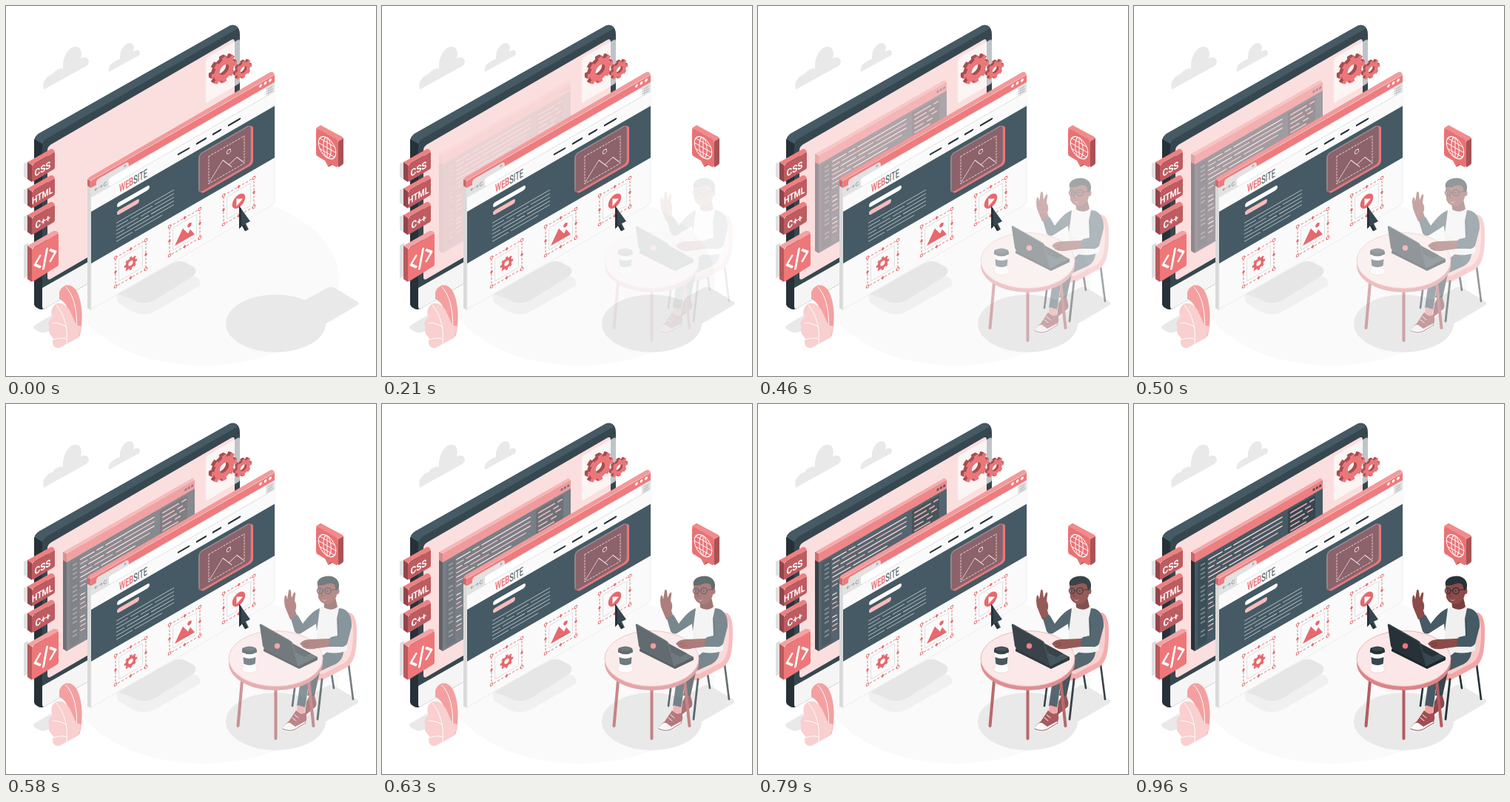
An HTML page for the animation above (1 s loop, 500 by 500 pixels).

```html
<!DOCTYPE html>
<html lang="en">
<head>
<meta charset="utf-8">
<title>Web development</title>
<style>
  html, body { margin: 0; width: 100%; height: 100%; overflow: hidden; background: #fff; }
  svg { display: block; width: 100vw; height: 100vh; }
  text { font-family: Roboto, Arial, sans-serif; }
  .fade { animation: fade 1s ease-in-out infinite; }
  @keyframes fade { from { opacity: 0; } to { opacity: 1; } }
  .line { fill: none; stroke-linecap: round; stroke-linejoin: round; }
  .tag { font-weight: 700; fill: #fff; }
</style>
</head>
<body>
<svg viewBox="0 0 500 500">
  <defs>
    <g id="gear" fill="none" stroke="currentColor">
      <circle r="10" stroke-width="7.5"/>
      <circle r="14.7" stroke-width="5" pathLength="16" stroke-dasharray="1" stroke-dashoffset=".5"/>
    </g>
    <g id="solidGear">
      <g color="#a34f53">
        <use href="#gear" x="-4" y="-4.4"/>
        <use href="#gear" x="-3" y="-3.3"/>
        <use href="#gear" x="-2" y="-2.2"/>
        <use href="#gear" x="-1" y="-1.1"/>
      </g>
      <use href="#gear" color="#ea7779"/>
    </g>
    <g id="handles">
      <rect x="4.5" y="4.5" width="32" height="30" rx="2" fill="#fafafa" stroke="#dcdcdc" stroke-width=".8"/>
      <rect width="41" height="39" fill="none" stroke="#e9767a" stroke-dasharray="3 2"/>
      <g fill="#fff" stroke="#e06b6f">
        <circle r="1.8"/><circle cx="41" r="1.8"/>
        <circle cy="39" r="1.8"/><circle cx="41" cy="39" r="1.8"/>
      </g>
      <path d="M20.5-2.5l2 2.5-2 2.5-2-2.5zM20.5 36.5l2 2.5-2 2.5-2-2.5zM0 17l2 2.5-2 2.5-2-2.5zM41 17l2 2.5-2 2.5-2-2.5z" fill="#e06b6f"/>
    </g>
    <g id="label">
      <path d="M24 213l6-3v24l-6-3z" fill="#e0e0e0"/>
      <path d="M29 211L60 193.500Q64 192 66 197L35 215z" fill="#ef8082"/>
      <path d="M29 211l6 4v23l-6-4z" fill="#90464b"/>
      <path d="M35 217Q35 215 37 214L64 198.300Q66 197 66 199V218Q66 220 64 221L37 237Q35 238 35 236z" fill="#bd5c61"/>
    </g>
  </defs>

  <!-- floor and shadows -->
  <ellipse cx="267" cy="370" rx="183" ry="116" fill="#fafafa"/>
  <g fill="#e9e9e9">
    <ellipse cx="364.500" cy="429" rx="67.500" ry="39"/>
    <path d="M403 398L434 381Q439 378 444 381L474 399Q479 402 474 405L429 431z"/>
    <path d="M38 432L68 414 88 426 54 441Q48 443 44 440L39 437Q35 434 38 432z"/>
  </g>

  <!-- clouds -->
  <g fill="#e9e9e9">
    <path d="M51 113C48 102 55 95 63 92C67 86 72 84 77 85C76 67 86 54 95 55C102 56 103 63 101 71C107 68 112 70 112 76C111 79 109 81 105 83z"/>
    <path d="M139 89C138 82 141 78 146 76C149 73 152 72 154 72C153 62 159 51 167 50C172 50 174 55 172 62C177 58 182 60 181 65C180 67 178 68 175 69z"/>
  </g>

  <!-- stand -->
  <path d="M150 390L215 352 258 367Q264 371 262 378L204 411Q186 422 168 411L153 402Q148 398 150 390z" fill="#f0f0f0"/>
  <path d="M151 389L226 347Q236 342 245 348L254 353Q259 358 254 364L202 397Q185 406 170 396z" fill="#e6e6e6"/>

  <!-- monitor -->
  <path d="M38 184Q38 176 45 172L300 28Q306 24 311 27Q316 30 316 38V257L52 409Q48 411 44 409L41 407Q38 405 38 401z" fill="#37474f"/>
  <path d="M38 184Q38 176 45 172L300 28Q306 24 311 27L314 30 55 179Q49 183 49 190V410L41 407Q38 405 38 401z" fill="#455a64"/>
  <path d="M38 180L49 186V410Q44 410 41 407Q38 405 38 401z" fill="#263238"/>
  <path d="M49 381L130 335V364L53 408.500Q49 411 49 405z" fill="#f5f5f5"/>
  <path d="M56 195Q56 190 61 187L304 46Q309 43 309 49V224L60 369Q56 371 56 366z" fill="#fbdfdf"/>
  <path d="M270 74Q270 71 273 69L313 46Q316 44 316 48V102Q316 104 314 105.500L270 131z" fill="#fff" opacity=".68"/>

  <!-- code editor -->
  <g class="fade">
    <path d="M77 200L252 100 255 103 82 203z" fill="#f7a5a6"/>
    <path d="M77 200l5 3v131l-5-3z" fill="#263238"/>
    <path d="M77 200l5 3v11l-5-3z" fill="#c9666a"/>
    <g transform="matrix(1 -.577 0 1 82 203)">
      <rect width="173" height="131" fill="#455a64"/>
      <rect width="173" height="11" fill="#ee7f81"/>
      <rect x="4" y="14" width="13" height="114" fill="#3c4f59"/>
      <rect x="126" y="14" width="37" height="70" fill="#37474f"/>
      <g fill="#37474f"><circle cx="161" cy="5.500" r="1.600"/><circle cx="165.300" cy="5.500" r="1.600"/><circle cx="169.600" cy="5.500" r="1.600"/></g>
      <path d="M11 19V119" stroke="#7d8b92" stroke-width="6" stroke-dasharray="2 4 2 4 2 4 2 10"/>
      <g class="line" stroke-width="1.500">
        <path d="M19 18H37M41 18H49M53 18H118M19 30H26M30 30H50M54 30H118M19 42H43M47 42H92M19 66H24M19 72H25M19 96H24M19 102H25" stroke="#fbdfdf"/>
        <path d="M19 24H28M32 24H74M78 24H118M19 36H34M38 36H62M67 36H112M19 48H27M19 54H25M19 78H24M19 84H26M19 108H25M19 114H24" stroke="#f4b4b4"/>
        <path d="M130 19H151M130 25H145M130 31H148M130 37H141M130 43H150M156 19H161M150 25H156M153 31H159M147 37H153" stroke="#d9a9ad" stroke-width="2"/>
      </g>
    </g>
  </g>

  <!-- gears -->
  <use href="#solidGear" transform="matrix(1 -.577 0 1 295 86)"/>
  <use href="#solidGear" transform="matrix(.66 -.38 0 .66 321 86)"/>

  <!-- browser -->
  <path d="M110 236Q110 233 113 231L356 90Q361 87 363 93L115 236z" fill="#f39a9b"/>
  <path d="M110 234l5 3v174l-5-3z" fill="#d9d9d9"/>
  <path d="M110 234l5 3v9l-5-3z" fill="#cf696c"/>
  <g transform="matrix(1 -.577 0 1 115 236)">
    <path d="M0 0H248V171Q248 174 245 174H0z" fill="#fafafa" stroke="#ebebeb" stroke-width=".8"/>
    <rect width="248" height="10" fill="#ee7b7d"/>
    <path d="M0 10H7V6Q7 3 10 3H47Q51 3 51 10H248V24H0z" fill="#e2e2e2"/>
    <path d="M27 11H233Q236 11 236 14V22H27Q24 22 24 19V14Q24 11 27 11z" fill="#fff"/>
    <path d="M0 23H248V42H0z" fill="#fafafa"/>
    <g fill="#fff"><circle cx="229" cy="4" r="1.900"/><circle cx="235.500" cy="4" r="1.900"/><circle cx="242" cy="4" r="1.900"/></g>
    <g class="line" stroke="#949ea3" stroke-width=".9">
      <path d="M5 15.500H9M6.500 14L5 15.500 6.500 17M11 15.500H15M13.500 14L15 15.500 13.500 17M21 14.200A2.200 2.200 0 1 0 21 17M45 5.500l2 2M47 5.500l-2 2M239 14H245M239 17H245M239 20H245"/>
    </g>
    <g transform="translate(38 38) scale(.62 1)">
      <text font-size="15" font-weight="700" fill="#e9767a">WEB<tspan font-weight="400" fill="#37474f">SITE</tspan></text>
    </g>
    <path class="line" d="M118 32.500H132M143 32.500H155M165 32.500H175M186 32.500H201" stroke="#263238" stroke-width="2.400"/>
    <rect y="42" width="248" height="70" fill="#455a64"/>
    <path class="line" d="M38 54H76" stroke="#fff" stroke-width="6"/>
    <path class="line" d="M38 64.500H62" stroke="#f6bcbc" stroke-width="6"/>
    <path d="M34 77H112M34 82H50M53 82H83M86 82H112M34 87H64M67 87H112M34 92H45M48 92H78M81 92H112M34 97H112M34 102H56M59 102H96" stroke="#d5dbde" stroke-width=".8"/>
    <rect x="148" y="50.500" width="71" height="53.500" rx="5" fill="#ed777a"/>
    <rect x="145.500" y="48.500" width="70.500" height="52.500" rx="5" fill="#8c626b" stroke="#a98188" stroke-width=".8"/>
    <path class="line" d="M146 96V54Q146 49 151 49H211" stroke="#8f8b91" stroke-width="1.600"/>
    <g class="line" stroke="#f2dcdc" stroke-width=".9">
      <rect x="159" y="59" width="48" height="37" stroke-dasharray="2 2"/>
      <path d="M160 94L178 75 190 91M186 86L197 82 206 94"/>
      <circle cx="186" cy="68" r="2.700"/>
    </g>
  </g>

  <!-- content boxes -->
  <g transform="matrix(1 -.577 0 1 148 340)">
    <use href="#handles"/>
    <use href="#gear" transform="translate(20.500 19.500) scale(.51)" color="#e5696d"/>
  </g>
  <g transform="matrix(1 -.577 0 1 221 298)">
    <use href="#handles"/>
    <path d="M7 30L18 13 25 24 28 20 34 30z" fill="#e5696d"/>
    <circle cx="27" cy="13.500" r="2.800" fill="#e5696d"/>
  </g>
  <g transform="matrix(1 -.577 0 1 294 256)">
    <use href="#handles"/>
    <circle cx="20.500" cy="19.500" r="8.800" fill="#e5696d"/>
    <path d="M17.500 14.500L26 19.500 17.500 24.500z" fill="#fff"/>
  </g>
  <path d="M315 270L330 291 324 294 328 302 323 304 319 297 315 301z" fill="#37474f"/>
  <path d="M315 270L318 274V298L315 301zM319 297l3-1 4 7-3 1z" fill="#263238"/>

  <!-- labels -->
  <use href="#label"/>
  <use href="#label" y="35.500"/>
  <use href="#label" y="71.500"/>
  <text class="tag" font-size="13" transform="matrix(.9 -.52 0 1 38.500 231)">CSS</text>
  <text class="tag" font-size="13" transform="matrix(.8 -.462 0 1 35 268.500)">HTML</text>
  <text class="tag" font-size="13" transform="matrix(.9 -.52 0 1 39.500 301.500)">C++</text>
  <path d="M24 323l6-3v45l-6 3z" fill="#e0e0e0"/>
  <path d="M29 324L64 304Q69 303 71 307L35 328z" fill="#f5a2a3"/>
  <path d="M29 324l6 4v45l-6-4z" fill="#b9595d"/>
  <path d="M35 330Q35 328 37 327L69 308Q71 307 71 309V349Q71 351 69 352L37 372Q35 373 35 371z" fill="#ee7779"/>
  <path class="line" transform="matrix(1 -.577 0 1 35 328)" d="M11 16L4 24 11 31M25 16L32 23 25 31M20.500 12L15.500 36" stroke="#fff" stroke-width="3"/>

  <!-- plant -->
  <path d="M72 387C76 376 87 374 94 383C104 397 105 430 99 447L82 440C90 424 85 401 72 396z" fill="#f4a0a1"/>
  <path class="line" d="M81 380C94 393 98 422 94 444" stroke="#fff"/>
  <path d="M68 402C75 400 81 404 86 411L95 431 102 433 98 448 72 462C65 463 61 457 64 449C60 445 56 440 59 434C56 430 57 424 63 421C60 413 61 407 68 402z" fill="#f9cfcf"/>
  <path class="line" d="M68 404C79 417 84 435 82 456M63 428Q74 428 82 434M64 451Q74 447 82 450" stroke="#fff"/>

  <!-- globe bubble -->
  <path d="M419 167Q419 164 422 163L425 161 453 176Q457 178 456 181L449 184z" fill="#f08c8d"/>
  <path d="M449 183l7-4v33q0 2-2 3l-5 3z" fill="#a85357"/>
  <path d="M436 217.500l5-3v-4l-6 2z" fill="#a85357"/>
  <path d="M419 169Q419 165 423 167L446 180Q449 182 449 185V215Q449 219 445 217L439 213.500 435.500 217.500 431 209 421 203Q419 202 419 199z" fill="#e97274"/>
  <g class="line" transform="matrix(.87 .5 0 1 434 191.500)" stroke="#fff" stroke-width="1.100">
    <circle r="13.500"/>
    <ellipse rx="6" ry="13.500"/>
    <path d="M0-13.500V13.500M-13.500 0H13.500M-11.500-7H11.500M-11.500 7H11.500"/>
  </g>

  <!-- man at the table -->
  <g class="fade">
    <g class="line" stroke="#263238" stroke-width="2.600">
      <path d="M391 377L387 408M463 352L469 399M440 365L443 384"/>
    </g>
    <path d="M459 283C468 278 474 289 474 305C474 329 473 346 462 355L428 373Q416 375 405 367L418 344 450 336z" fill="#f3a5a6"/>
    <path d="M459 286C466 286 470 296 469 310C469 333 465 347 455 351L428 365 409 360 421 344 450 336z" fill="#f9cccc"/>
    <path class="line" d="M427 372L421 426" stroke="#263238" stroke-width="2.800"/>

    <!-- legs and shoes -->
    <path d="M406 402L415 387 419 402Q421 409 414 414L404 421z" fill="#8d464a"/>
    <path d="M404 421L420 408V411L406 423z" fill="#fff"/>
    <path d="M413 362L424 362 417 394 407 394z" fill="#37474f"/>
    <path d="M440 330L456 335Q455 348 442 353L420 363Q411 370 408 385L404 411 393 408 397 380Q398 361 418 348z" fill="#455a64"/>
    <path d="M394 407l11 3-2 9-10-3z" fill="#f3a0a0"/>
    <path d="M392 414Q399 421 405 417Q408 425 404 431L391 439Q382 444 375 439Q373 435 382 429z" fill="#a34d52"/>
    <path d="M375 436Q379 430 384 431L391 436 404 429V433L391 441Q382 445 375 441Q373 439 375 436z" fill="#fff"/>
    <path class="line" d="M374 439Q382 443 390 440L405 431" stroke="#8d464a" stroke-width="1"/>
    <path class="line" d="M387 424l5 4M390 420l5 4" stroke="#fff" stroke-width="1"/>

    <!-- torso and head -->
    <path d="M423 276Q436 271 450 274Q462 278 463 291L461 333Q442 341 420 331Q421 304 418 293z" fill="#f0f0f0"/>
    <path d="M429 262L445 261 448 274Q440 281 430 275z" fill="#75403d"/>
    <path d="M421 244Q434 235 447 243L448 255Q445 268 436 270.500Q426 271 422 262z" fill="#8c4b48"/>
    <ellipse cx="447.500" cy="253" rx="3" ry="4" fill="#8c4b48"/>
    <path d="M421 245C419 237 427 232 437 232.500C447 233 452 241 449.500 250L446 252 444 244Q440 241 434 243Q428 246 421 245z" fill="#263238"/>
    <g class="line" stroke="#263238" stroke-width="1.200">
      <circle cx="424" cy="252.500" r="3.600"/>
      <circle cx="435" cy="252.500" r="4.200"/>
      <path d="M427.600 252H430.800M439 251.500L447 250.500"/>
    </g>
    <g fill="#263238"><circle cx="424" cy="252.500" r="1"/><circle cx="434.500" cy="252.500" r="1"/></g>
    <path class="line" d="M428 254l-2 5 3 1" stroke="#66322f" stroke-width="1"/>
    <path d="M427 264q4 2.500 7-.5q-2.500 4-7 .5z" fill="#fff"/>

    <!-- raised arm -->
    <path d="M384 291L377 274Q375 263 377 259Q379 257 380 264L382 252Q384 249 385 253L386 262 389 255Q392 253 391 258L390 266Q394 272 391 279L395 291z" fill="#8c4b48"/>
    <path d="M424 276C415 279 406 290 401 297L394 285 385 290 390 307Q394 313 400 309L419 297 420 307z" fill="#455a64"/>

    <!-- table -->
    <g class="line" stroke="#b45c60" stroke-width="4">
      <path d="M319 374L313.500 435M364.500 383V452M409 373L415.500 435"/>
    </g>
    <path d="M301 344A63.500 37 0 0 0 428 344V350A63.500 37 0 0 1 301 350z" fill="#dc8487"/>
    <ellipse cx="364.500" cy="344" rx="63.500" ry="37.500" fill="#fce7e7"/>
    <path class="line" d="M301 344A63.500 37.500 0 0 1 428 344A63.500 37.500 0 0 1 301 344" stroke="#f3b0b1" stroke-width="1"/>

    <!-- laptop -->
    <path d="M348 331L374 317 421 342V346L396 358 348 334z" fill="#1c262b"/>
    <path d="M351 330L375 318 420 342 396 354z" fill="#37474f"/>
    <path d="M370 323L379 319 412 337 403 342z" fill="#263238"/>
    <path d="M343 300Q342 296 346 298L383 319Q387 321 388 325L396 355 351 332Q348 330 347 327z" fill="#263238"/>
    <path class="line" d="M344 298L383 320Q386 322 387 325L395 354" stroke="#455a64" stroke-width=".8"/>
    <circle cx="366.500" cy="327" r="3.700" fill="#ee7779"/>

    <!-- typing arm -->
    <path d="M453 313L452 326 421 330Q408 333 402 329L397 324Q402 317 414 318L436 317z" fill="#8c4b48"/>
    <path class="line" d="M402 324l7-1M402 328l8-2" stroke="#66322f" stroke-width=".8"/>
    <path d="M450 276C462 276 468 287 467 301L461 324Q458 329 451 328L437 328Q435 320 439 315L448 313 447 290z" fill="#455a64"/>
    <path class="line" d="M449 293L449 313" stroke="#37474f" stroke-width="1.200"/>

    <!-- cup -->
    <ellipse cx="329" cy="358" rx="10.500" ry="5.500" fill="#fff" stroke="#f3c0c0" stroke-width=".7"/>
    <path d="M320 334H338L336 360Q329 364 322 360z" fill="#fff"/>
    <path d="M320.500 342Q329 346 337.500 342L336.700 351Q329 355 321.300 351z" fill="#37474f"/>
    <path d="M319 333Q319 329 322 329Q329 326 336 329Q339 330 339 334V335.500Q329 341 319 335.500z" fill="#263238"/>
    <ellipse cx="329" cy="331" rx="7.500" ry="2.700" fill="#37474f"/>
  </g>
</svg>
</body>
</html>
```
